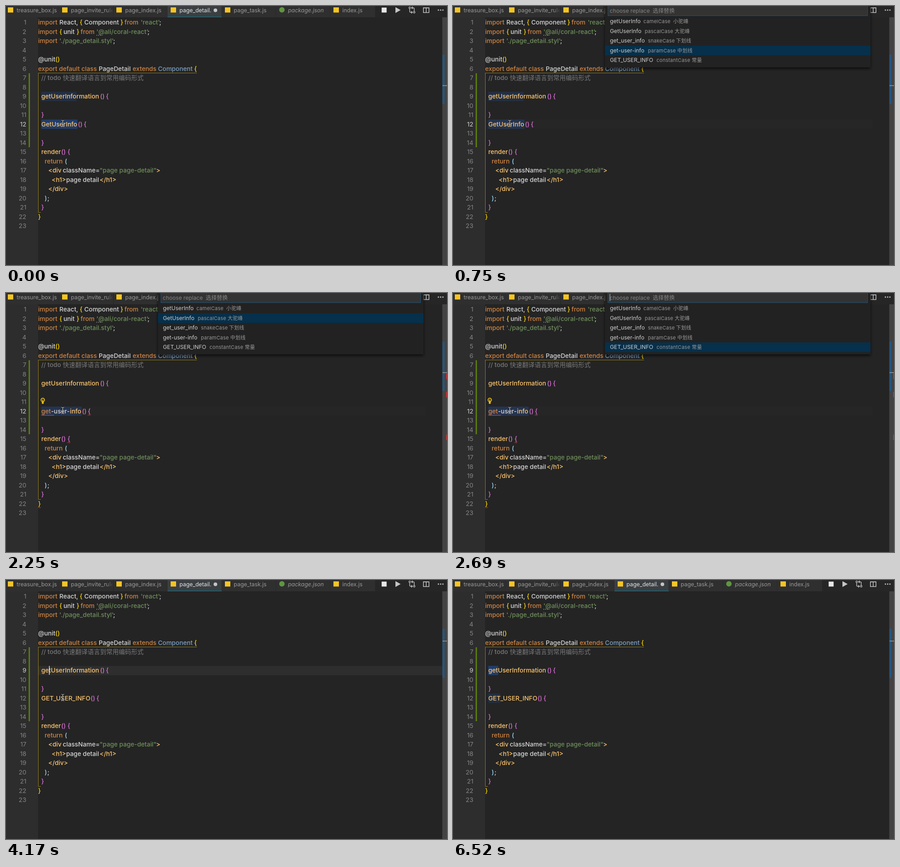
An HTML page that plays this animation: 975 by 574 pixels, repeating every 6620 ms.

```html
<!DOCTYPE html>
<html lang="en">
<head>
<meta charset="utf-8">
<title>Case switcher</title>
<style>
  html, body { margin: 0; width: 100%; height: 100%; overflow: hidden; background: #242424; }
  svg { display: block; width: 975px; height: 574px; }
  text { font-family: Inter, "Noto Sans CJK SC", "Noto Sans CJK", sans-serif; white-space: pre; }
  .code { font-size: 13.75px; font-weight: 500; }
  .tab { font-size: 12.4px; }
  .pick { font-size: 12.2px; }
  .desc { font-size: 11px; letter-spacing: .25px; }
</style>
</head>
<body>
<svg id="stage" viewBox="0 0 975 574">
  <defs>
    <linearGradient id="fade"><stop stop-color="#2f2f2f" stop-opacity="0"/><stop offset="1" stop-color="#2f2f2f"/></linearGradient>
    <filter id="shadow" x="-5%" y="-10%" width="110%" height="125%">
      <feDropShadow dx="0" dy="3" stdDeviation="3" flood-color="#000" flood-opacity=".7"/>
    </filter>
  </defs>
</svg>
<script>
(() => {
const LOOP = 6620, LINE = 20.52;
const C = {
  k: '#d08442', w: '#d6d6d6', s: '#6f8f5b', f: '#ffc66d', b: '#7b9fc4', c: '#787878',
  g: '#ffd700', o: '#da70d6', l: '#9cdcfe'
};
const stage = document.getElementById('stage');

function add(tag, attrs, parent = stage, label) {
  const el = document.createElementNS('http://www.w3.org/2000/svg', tag);
  for (const key in attrs) el.setAttribute(key, attrs[key]);
  if (label !== undefined) el.textContent = label;
  parent.appendChild(el);
  return el;
}
const rect = (x, y, width, height, fill, parent) => add('rect', { x, y, width, height, fill }, parent);
const path = (d, stroke, parent, w = 1, fill = 'none') => add('path', { d, stroke, fill, 'stroke-width': w }, parent);
const write = (x, y, label, fill, cls, parent, extra) => add('text', { x, y, fill, class: cls, ...extra }, parent, label);
const group = () => add('g', {});
const baseline = n => 41 + LINE * (n - 1);
const rowTop = n => 26.3 + LINE * (n - 1);
const show = (el, on) => el.setAttribute('visibility', on ? 'visible' : 'hidden');
const place = (el, box) => {
  show(el, box);
  if (box) ['x', 'y', 'width', 'height'].forEach((key, i) => el.setAttribute(key, box[i]));
};

// Backdrop
rect(0, 0, 975, 574, '#242424');
rect(0, 0, 71, 574, '#2d2d2d');
const rowGlow = rect(0, 0, 0, 0, '#2e2e2e');
const echo = rect(0, 0, 0, 0, '#222f45');
const selection = rect(0, 0, 0, 0, '#213d6b');
rect(50, 149, 3, 164, '#587c0c');
const scope = path('M71 148.5H422M71.5 148V457.5H77', '#93801a');

// Code: tokens are "colour x text"
const LINES = {
  1: ['k 71 import', 'w 118 React,', 'g 163 {', 'w 173 Component', 'g 253 }', 'k 262 from', "s 298 'react'", 'w 339 ;'],
  2: ['k 71 import', 'g 118 {', 'w 127 unit', 'g 156 }', 'k 165 from', "s 200 '@ali/coral-react'", 'w 313 ;'],
  3: ['k 71 import', "s 118 './page_detail.styl'", 'w 237 ;'],
  5: ['w 71 @unit', 'g 109 ()'],
  6: ['k 71 export default class', 'w 205 PageDetail', 'k 280 extends', 'b 336 Component', 'g 416 {'],
  7: ['c 78 // todo', 'c 125.5 快速翻译语言到常用编码形式'],
  9: ['f 78 getUserInformation', 'o 208 ()', 'o 221 {'],
  14: ['o 78 }'],
  15: ['f 78 render', 'o 122 ()', 'o 136 {'],
  16: ['k 85.5 return', 'l 130 ('],
  17: ['f 93.5 <div', 'w 125.5 className=', 's 207 "page page-detail"', 'f 332 >'],
  18: ['f 101 <h1>', 'w 133 page detail', 'f 207 </h1>'],
  19: ['f 93.5 </div>'],
  20: ['l 85.5 )', 'w 91.5 ;'],
  21: ['o 78 }'],
  22: ['g 71 }']
};
function code(n, tokens, parent) {
  for (const token of tokens) {
    const [, color, x, label] = token.match(/^(\w) ([\d.]+) (.*)$/);
    write(x, baseline(n), label, C[color], 'code', parent);
  }
}
for (const n in LINES) code(+n, LINES[n]);
const closing = group();
code(11, ['o 78 }'], closing);
const names = [
  ['f 78 GetUserInfo', 'o 159 ()', 'o 172 {'],
  ['k 78 get', 'w 99.5 -user-', 'f 141.5 info', 'o 168 ()', 'o 181 {'],
  ['f 78 GET_USER_INFO', 'o 187 ()', 'o 200 {']
].map(tokens => { const g = group(); code(12, tokens, g); return g; });
[200, 204, 208].forEach(x => rect(x, 64, 1.5, 1.5, '#aaa'));
const numbers = Array.from({ length: 23 }, (_, i) =>
  write(45, baseline(i + 1), i + 1, '#858585', 'code', stage, { 'text-anchor': 'end', style: 'font-weight:400' }));

// Error marks
const errors = group();
function squiggle(x, end, y) {
  let d = `M${x} ${y + 1}`;
  for (let i = 1; x + i * 2 <= end; i++) d += `L${x + i * 2} ${y + (i % 2 ? -1 : 1)}`;
  path(d, '#e34b4b', errors);
}
squiggle(78, 106, 271);
squiggle(181, 187, 270.5);
squiggle(136, 142, 331.5);
squiggle(71, 77, 475.5);

const bulb = group();
add('circle', { cx: 81.3, cy: 237, r: 3.8, fill: '#242424', stroke: '#f5c518', 'stroke-width': 1.8 }, bulb);
rect(79.3, 241, 4, 4.5, '#f5c518', bulb);
rect(80.5, 236, 1.6, 4, '#f5c518', bulb);

const caret = rect(0, 0, 0, 0, '#e0e0e0');

// Overview ruler
rect(964.5, 25, 10.5, 549, '#434343');
rect(965, 108, 4.5, 109, '#24567f');
const mark = rect(965, 176, 10, 1.5, '#9a9a9a');
const redMarks = group();
[179, 219, 314].forEach(y => rect(973, y, 2, 12, '#c03030', redMarks));

// Tabs
rect(0, 0, 975, 25, '#262626');
const TABS = ['treasure_box.js', 'page_invite_rule', 'page_index.js', 'page_detail.', 'page_task.js', 'package.json', 'index.js'];
TABS.forEach((label, i) => {
  const x = i * 120 - 3, active = i === 3, pkg = i === 5;
  rect(x, 0, i === 6 ? 99 : 119.5, 25, active ? '#3b3f42' : '#2f2f2f');
  if (pkg) add('circle', { cx: 610, cy: 8.5, r: 6, fill: '#5f9640' });
  else rect(x + 7, 3, 12, 11.5, '#f5c426');
  write(x + 26.5, 14, label, active ? '#e4e4e4' : '#999', 'tab', stage, pkg ? { 'font-style': 'italic' } : {});
});
rect(222, 0, 15, 25, 'url(#fade)');
rect(237, 0, 1, 25, '#262626');
rect(357, 23.8, 120, 1.2, '#087a91');
add('circle', { cx: 463, cy: 9.5, r: 4, fill: '#c5c5c5' });

// Toolbar
rect(830.5, 3.5, 11, 11, '#e8e8e8');
path('M861 2.5L872.5 9L861 15.5Z', 'none', stage, 0, '#c5c5c5');
path('M892.5 6V12Q892.5 14 895 14H898M896 11.5L898.5 14L896 16.5M902.5 12V6Q902.5 4 900 4H897M899 1.5L896.5 4L899 6.5', '#c5c5c5', stage, 1.4);
[[892.5, 4], [902.5, 14]].forEach(([cx, cy]) =>
  add('circle', { cx, cy, r: 1.8, fill: '#262626', stroke: '#c5c5c5', 'stroke-width': 1.3 }));
path('M922.8 4H935.2V14.5H922.8ZM929 4V14.5M922 4.3H936', '#c5c5c5', stage, 1.5);
[956, 961, 966].forEach(cx => add('circle', { cx, cy: 9, r: 1.5, fill: '#c5c5c5' }));

// Quick pick
const picker = group();
rect(336, -8, 587, 144, '#212121', picker).setAttribute('filter', 'url(#shadow)');
add('rect', { x: 342.5, y: -5, width: 574, height: 26.5, fill: '#333', stroke: '#1d5478' }, picker);
write(346.5, 14.5, 'choose replace', '#848484', 'pick', picker);
write(441.5, 14.5, '选择替换', '#848484', 'pick', picker);
const focusRow = rect(336, 24, 587, 21.4, '#06304b', picker);
[
  ['getUserInfo', 421, 'camelCase', 487, '小驼峰'],
  ['GetUserInfo', 424, 'pascalCase', 490, '大驼峰'],
  ['get_user_info', 431, 'snakeCase', 493, '下划线'],
  ['get-user-info', 431, 'paramCase', 496, '中划线'],
  ['GET_USER_INFO', 450, 'constantCase', 528, '常量']
].forEach(([name, x, style, x2, hint], i) => {
  const y = 38.3 + i * 21.45;
  write(347, y, name, '#cfcfcf', 'pick', picker);
  write(x, y, style, '#999', 'desc', picker);
  write(x2, y, hint, '#999', 'desc', picker);
});
const pickCaret = rect(346.5, 2, 1, 16, '#d0d0d0', picker);

// I-beam pointer
const pointer = group();
const beam = 'M-3 -7.5Q0 -7.5 0 -5V5Q0 7.5 -3 7.5M3 -7.5Q0 -7.5 0 -5M0 5Q0 7.5 3 7.5M-1.8 3H1.8';
path(beam, '#111', pointer, 2.4);
path(beam, '#eee', pointer, 1);

// Timeline: each step overrides part of the state. Spans are [line, x, width].
const STEPS = [
  [0, { name: 0, sel: [12, 78, 80], echo: [9, 78, 78], focus: true, row: -1, typing: false, errors: false,
        bulb: false, line: 12, caret: null, glow: false, scope: true }],
  [300, { row: 0, typing: true, focus: false }],
  [600, { row: 2 }],
  [750, { row: 3, typing: false }],
  [1050, { row: -1, name: 1, sel: [12, 78, 89], echo: null, focus: true }],
  [1500, { errors: true }],
  [1650, { row: 0, typing: true, bulb: true, focus: false }],
  [2250, { row: 1, typing: false }],
  [2390, { row: 2 }],
  [2540, { row: 3 }],
  [2690, { row: 4, typing: true }],
  [2840, { row: -1, name: 2, sel: [12, 78, 108], focus: true }],
  [3140, { errors: false, bulb: false }],
  [3290, { sel: null, caret: [12, 95], glow: true }],
  [3440, { line: 11, caret: [11, 84], scope: false }],
  [3730, { line: 10, caret: [10, 78] }],
  [3880, { line: 9, caret: [9, 95], scope: true }],
  [4470, { sel: [9, 78, 22], echo: [12, 78, 26], caret: [9, 99.5], glow: false }],
  [4910, { caret: null }],
  [5500, { caret: [9, 99.5] }],
  [5940, { caret: null }]
];
const EXIT = 5500, STEP = 1020 / 7;

function pointerAt(t) {
  if (t < EXIT) return [125.5, 260.5];
  const n = Math.floor((t - EXIT) / STEP + .01) + 1;
  if (n > 7) return null;
  const p = (n / 7) ** 1.6;
  return [125.5 + 821 * p, 260.5 + 296 * p];
}

function render(t) {
  const s = Object.assign({}, ...STEPS.filter(step => step[0] <= t).map(step => step[1]));
  const span = b => b && [b[1], rowTop(b[0]) - .3, b[2], LINE];
  names.forEach((g, i) => show(g, i === s.name));
  place(selection, span(s.sel));
  selection.setAttribute('fill', s.focus ? '#213d6b' : '#253450');
  place(echo, span(s.echo));
  place(caret, s.caret && [s.caret[1], rowTop(s.caret[0]), 1.5, 19.5]);
  place(rowGlow, (s.glow || !s.focus) && [71, rowTop(s.line), s.focus ? 894 : 857, LINE]);
  rowGlow.setAttribute('fill', s.focus ? '#2e2e2e' : '#262626');
  numbers.forEach((el, i) => el.setAttribute('fill', i + 1 === s.line ? '#d0d0d0' : '#858585'));
  mark.setAttribute('y', 25 + (s.line - 1) * 13.7);
  show(scope, s.scope);
  show(errors, s.errors);
  show(redMarks, s.errors);
  show(bulb, s.bulb);
  show(closing, !s.bulb);
  picker.setAttribute('display', s.row < 0 ? 'none' : 'inline');
  focusRow.setAttribute('y', 23.7 + s.row * 21.45);
  pickCaret.setAttribute('display', s.typing ? 'inline' : 'none');
  const at = pointerAt(t);
  show(pointer, at);
  if (at) pointer.setAttribute('transform', `translate(${at})`);
}

const start = performance.now();
function tick() {
  render((performance.now() - start) % LOOP);
  requestAnimationFrame(tick);
}
render(0);
requestAnimationFrame(tick);
})();
</script>
</body>
</html>
```
